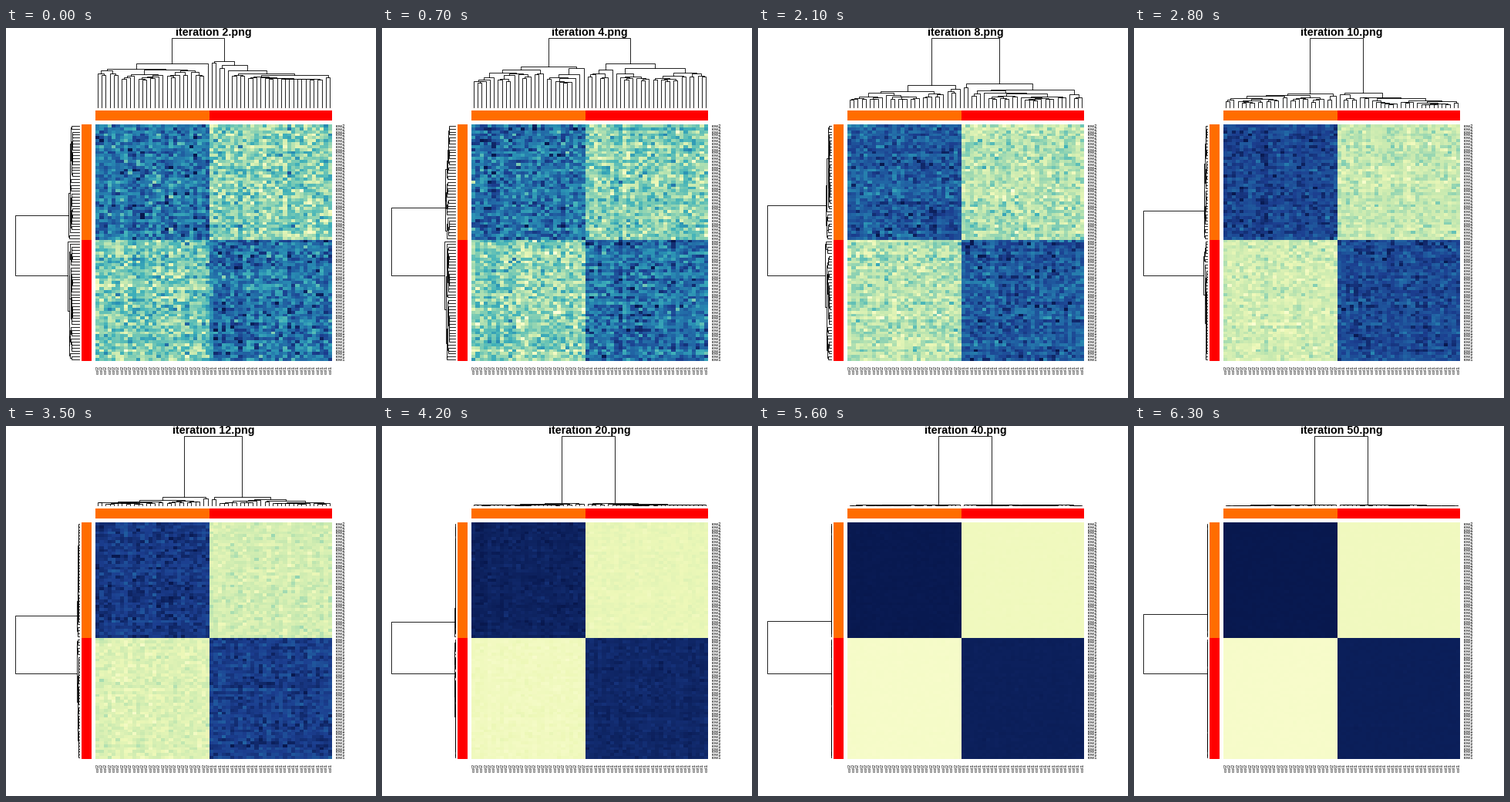
Recreate the animation shown at these times as a matplotlib script. Size 480 px wide and 480 px high, loop 7 s.

```python
import math
import random

import matplotlib.pyplot as plt
import numpy as np
from matplotlib.animation import FuncAnimation
from matplotlib.colors import LinearSegmentedColormap
from matplotlib.patches import Rectangle

SIZE = 480
LEFT, RIGHT, TOP, BOTTOM = 116, 423, 125, 432
COLS, ROWS = 58, 80
COL_SPLIT, ROW_SPLIT = 28, 39
CELL_W = (RIGHT - LEFT) / COLS
CELL_H = (BOTTOM - TOP) / ROWS
MID_X = LEFT + COL_SPLIT * CELL_W
MID_Y = TOP + ROW_SPLIT * CELL_H
COL_BASE, COL_ROOT = 103, 13
ROW_BASE, ROW_ROOT = 95, 12
ORANGE, RED = "#ff6d00", "#ff0000"
ITERATIONS = [2, 4, 6, 8, 10, 12, 20, 30, 40, 50]

cmap = LinearSegmentedColormap.from_list("blues", [
    "#ffffd9", "#edf8b8", "#c7e9b0", "#7fcdb4", "#41b2ba",
    "#2a90b4", "#2268a6", "#1c3f90", "#08184e"])


def disorder(n):
    """Falls smoothly from 1 to 0 as the iterations converge."""
    return 1 / (1 + (n / 8) ** 3.9)


def grow(rng, start, n, height, low):
    """Random binary tree over n leaves: centre, height and brackets."""
    if n == 1:
        return start + .5, 0, []
    k = min(n - 1, 1 + int((n - 1) * rng.betavariate(.65, 1)))

    def child(first, size, shrink):
        return grow(rng, first, size, low + (height - low) * shrink, low)

    a, ha, left = child(start, k, rng.uniform(.65, .95))
    b, hb, right = child(start + k, n - k, rng.uniform(.55, .92))
    bracket = [(a, ha), (a, height), (b, height), (b, hb)]
    return (a + b) / 2, height, left + right + [bracket]


def tree_path(rng, n, mid, step, base, top, height, low):
    """Tree growing outwards from mid, centred as near to top as possible."""
    goal = (top - mid) / step
    tries = (grow(rng, 0, n, height, low) for _ in range(200))
    brackets = min(tries, key=lambda t: abs(t[0] - goal))[2]
    path = []
    for bracket in brackets:
        path += [(mid + step * p, base - h) for p, h in bracket]
        path.append((np.nan, np.nan))
    return path


def dendrogram(rng, mid, step, sizes, base, root, tops, height, ratio):
    a, b = tops
    ha, hb = height, height * 1.06
    path = tree_path(rng, sizes[0], mid, -step, base, a, ha, ha * ratio)
    path += tree_path(rng, sizes[1], mid, step, base, b, hb, hb * ratio)
    path += [(a, base - ha), (a, root), (b, root), (b, base - hb)]
    return np.array(path)


def heat(rng, s):
    dark, pale, spread = 1 - .3 * s ** .6, .07 + .3 * s ** .5, .12 * s ** .6
    drift = .02 * (1 - s)
    left = np.arange(COLS) < COL_SPLIT
    upper = (np.arange(ROWS) < ROW_SPLIT)[:, None]
    mean = np.where(upper, np.where(left, dark, pale + drift),
                    np.where(left, pale - drift, dark - drift))
    noise = (rng.normal(0, .92, (ROWS, COLS))
             + rng.normal(0, .28, (ROWS, 1))
             + rng.normal(0, .28, (1, COLS)))
    return np.clip(mean + spread * noise, 0, 1)


def build(i):
    n = ITERATIONS[i]
    s = disorder(n)
    rng = random.Random(n)
    height, ratio = 1 + 56 * s, .1 + .5 * s ** 1.5
    # The stems swing from step to step and settle with convergence.
    col_tops = 234 - 19 * s, 303 - 20 * s * math.cos(math.pi * i)
    row_tops = 242.5 - 14.5 * math.sin(math.pi * i / 4.6), 321
    cols = dendrogram(rng, MID_X, CELL_W, (COL_SPLIT, COLS - COL_SPLIT),
                      COL_BASE, COL_ROOT, col_tops, height, ratio)
    rows = dendrogram(rng, MID_Y, CELL_H, (ROW_SPLIT, ROWS - ROW_SPLIT),
                      ROW_BASE, ROW_ROOT, row_tops, height / 4, ratio)
    return cols, rows, heat(np.random.default_rng(n), s)


scenes = [build(i) for i in range(len(ITERATIONS))]

plt.rcParams["font.family"] = "Liberation Sans"
fig = plt.figure(figsize=(SIZE / 72, SIZE / 72), dpi=72, facecolor="white")
ax = fig.add_axes([0, 0, 1, 1])
ax.axis("off")


def bar(x0, y0, x1, y1, color):
    ax.add_patch(Rectangle((x0, y0), x1 - x0, y1 - y0, fc=color, lw=0))


image = ax.imshow(scenes[0][2], cmap=cmap, vmin=0, vmax=1, aspect="auto",
                  interpolation="nearest", extent=(LEFT, RIGHT, BOTTOM, TOP))
bar(LEFT, 107, MID_X, 120, ORANGE)
bar(MID_X, 107, RIGHT, 120, RED)
bar(98, TOP, 111, MID_Y, ORANGE)
bar(98, MID_Y, 111, BOTTOM, RED)

for c in range(COLS):
    ax.text(LEFT + (c + .5) * CELL_W + 2, 438,
            "col2" if c < COL_SPLIT else "col1", size=6.07, rotation=90,
            rotation_mode="anchor", ha="right", va="baseline")
for r in range(ROWS):
    ax.text(428, TOP + (r + .5) * CELL_H + 2,
            "row2" if r < ROW_SPLIT else "row1", size=5.75, va="baseline")

title = ax.text((LEFT + RIGHT) / 2, 10, "", size=14.26, weight="bold",
                ha="center", va="baseline")
style = dict(color="black", lw=.85, solid_joinstyle="miter")
col_line, = ax.plot([], [], **style)
row_line, = ax.plot([], [], **style)
ax.set_xlim(0, SIZE)
ax.set_ylim(SIZE, 0)


def update(i):
    cols, rows, values = scenes[i]
    title.set_text(f"iteration {ITERATIONS[i]}.png")
    col_line.set_data(cols[:, 0], cols[:, 1])
    row_line.set_data(rows[:, 1], rows[:, 0])
    image.set_data(values)
    return title, col_line, row_line, image


anim = FuncAnimation(fig, update, frames=len(ITERATIONS), interval=700,
                     repeat=True, repeat_delay=0)
plt.show()
```
